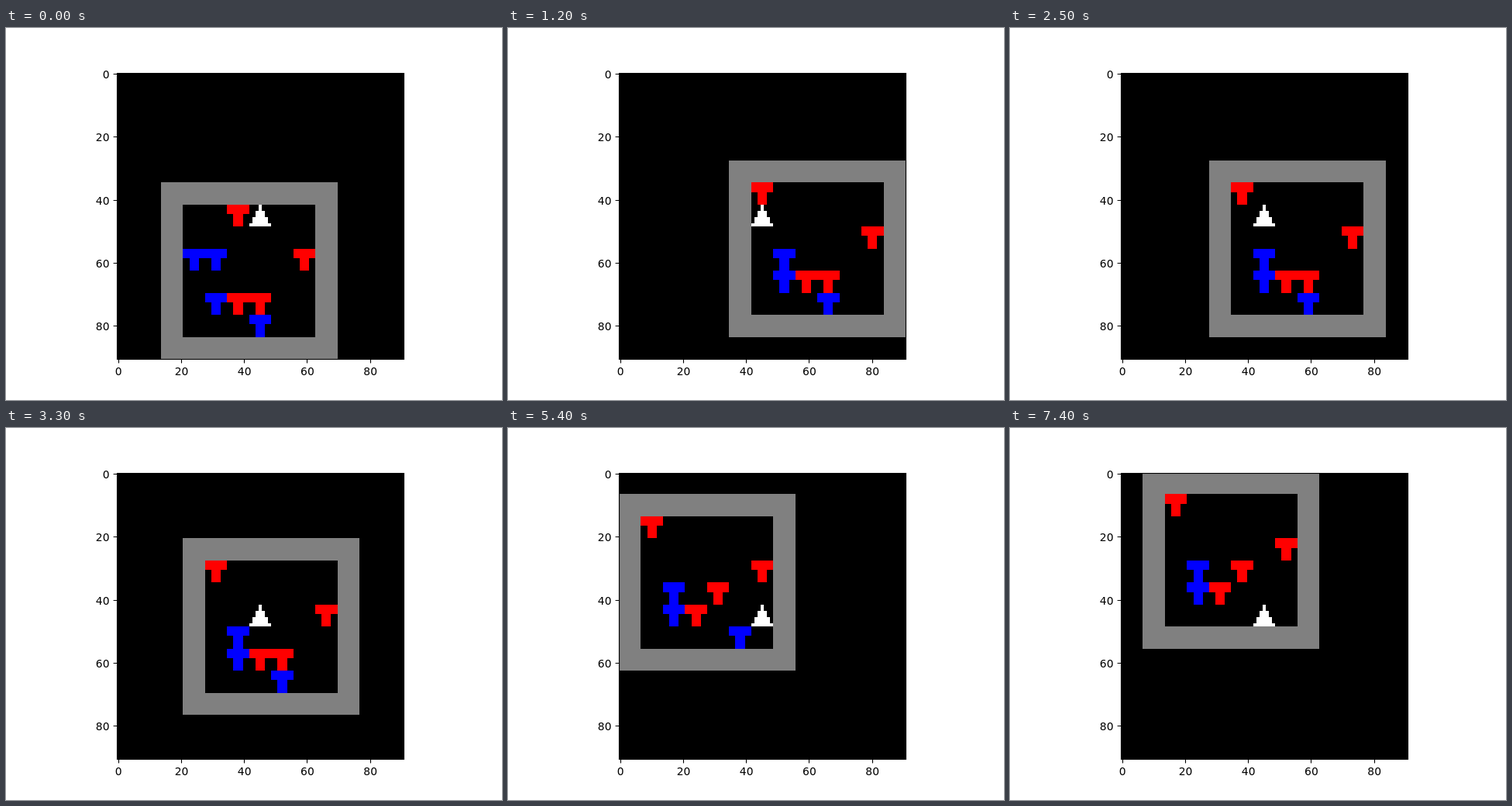
Recreate the animation shown at these times as an HTML page with a canvas. Size 640 by 480 pixels, loop 8 s.

```html
<!DOCTYPE html>
<html lang="en">
<head>
<meta charset="utf-8">
<title>Grid room</title>
<style>
  html, body { margin: 0; width: 100%; height: 100%; overflow: hidden; background: #fff; }
  canvas { display: block; }
</style>
</head>
<body>
<canvas id="stage" width="640" height="480"></canvas>
<script>
const ctx = document.getElementById('stage').getContext('2d');

const LOOP = 8000, TICK = 100;
const LEFT = 143, TOP = 57, SCALE = 370 / 91;
const CELL = 7, SIZE = 6, VIEW = 6;
const RED = '#f00', BLUE = '#00f', GREY = '#808080';

// One letter per tick; a dot is a tick without a move.
const MOVES = '.LL.' + 'DRLRLDL' + '.U.' + 'RRLLRRLLR' + 'U.' +
  'DRDDUULDR' + 'ULDLDDUD' + '.DU..DR.' + 'RRURR' + '.LDUL' +
  '..DL.LRL' + '..RRLRR' + '.....';
const STEP = { U: [0, -1], D: [0, 1], L: [-1, 0], R: [1, 0] };

const START = [
  [2, 0, RED], [5, 2, RED], [2, 4, RED], [3, 4, RED],
  [0, 2, BLUE], [1, 2, BLUE], [1, 4, BLUE], [3, 5, BLUE]
];

const inside = (x, y) => x >= 0 && y >= 0 && x < SIZE && y < SIZE;

// Blocks are pushed; a blue one pressed against the wall disappears.
function move(state, [dx, dy]) {
  const x = state.x + dx, y = state.y + dy;
  if (!inside(x, y)) return;
  const at = (px, py) => state.blocks.find(b => b.x === px && b.y === py);
  const block = at(x, y);
  if (block) {
    const nx = x + dx, ny = y + dy;
    if (inside(nx, ny)) {
      if (at(nx, ny)) return;
      block.x = nx;
      block.y = ny;
    } else if (block.color === BLUE) {
      state.blocks.splice(state.blocks.indexOf(block), 1);
    } else {
      return;
    }
  }
  state.x = x;
  state.y = y;
}

function stateAt(tick) {
  const state = { x: 3, y: 0, blocks: START.map(([x, y, color]) => ({ x, y, color })) };
  for (const m of MOVES.slice(0, tick + 1)) {
    if (STEP[m]) move(state, STEP[m]);
  }
  return state;
}

// Rectangle in picture units, snapped to screen pixels.
function box(x, y, w, h, color) {
  const px = v => Math.round(LEFT + v * SCALE);
  const py = v => Math.round(TOP + v * SCALE);
  ctx.fillStyle = color;
  ctx.fillRect(px(x), py(y), px(x + w) - px(x), py(y + h) - py(y));
}

function drawBlock(col, row, color) {
  const x = col * CELL, y = row * CELL;
  box(x, y, 7, 3, color);
  box(x + 2, y + 3, 3, 4, color);
}

function drawAgent() {
  const x = VIEW * CELL, y = VIEW * CELL;
  for (let i = 0; i < 4; i++) {
    box(x + 3 - i, y + 2 * i, 1 + 2 * i, i < 3 ? 2 : 1, '#fff');
  }
}

function drawAxes() {
  ctx.strokeStyle = ctx.fillStyle = '#000';
  ctx.lineWidth = 1.11;
  ctx.strokeRect(143.5, 58.5, 370, 369);
  ctx.font = '13.89px "DejaVu Sans", sans-serif';
  ctx.textBaseline = 'alphabetic';
  ctx.beginPath();
  for (let v = 0; v <= 80; v += 20) {
    const d = (v + 0.5) * 369.6 / 91;
    const x = Math.floor(143.2 + d) + 0.5, y = Math.floor(57.6 + d) + 0.5;
    ctx.moveTo(x, 427.5);
    ctx.lineTo(x, 432.4);
    ctx.moveTo(143.5, y);
    ctx.lineTo(138.6, y);
    ctx.textAlign = 'center';
    ctx.fillText(v, 143.2 + d, 448);
    ctx.textAlign = 'right';
    ctx.fillText(v, 133.5, y + 5.5);
  }
  ctx.stroke();
}

function draw(time) {
  const state = stateAt(Math.floor(time % LOOP / TICK));
  const ox = VIEW - state.x, oy = VIEW - state.y;

  ctx.fillStyle = '#fff';
  ctx.fillRect(0, 0, 640, 480);

  ctx.save();
  ctx.beginPath();
  ctx.rect(143, 58, 371, 370);
  ctx.clip();
  box(0, 0, 91, 91, '#000');
  box((ox - 1) * CELL, (oy - 1) * CELL, (SIZE + 2) * CELL, (SIZE + 2) * CELL, GREY);
  box(ox * CELL, oy * CELL, SIZE * CELL, SIZE * CELL, '#000');
  for (const b of state.blocks) drawBlock(ox + b.x, oy + b.y, b.color);
  drawAgent();
  ctx.restore();

  drawAxes();
}

const begin = performance.now();
function frame() {
  draw(performance.now() - begin);
  requestAnimationFrame(frame);
}
frame();
</script>
</body>
</html>
```
